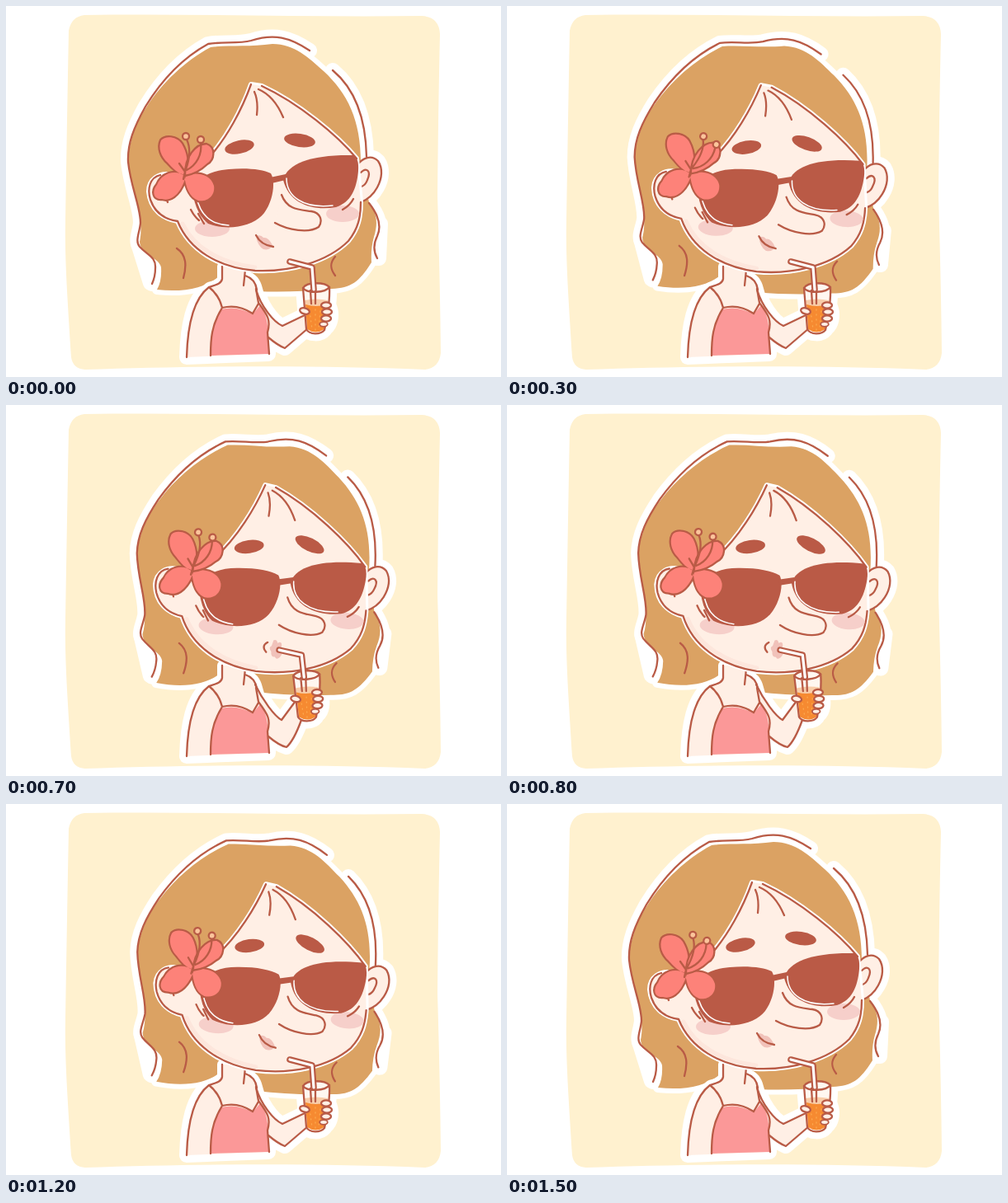
These frames come from a looping animation (600x450 px, 1600 ms). An HTML page without scripts:

```html
<!DOCTYPE html>
<html lang="en">
<head>
<meta charset="utf-8">
<title>Summer drink</title>
<style>
  @property --turn { syntax: "<number>"; inherits: true; initial-value: 0; }
  @property --sway { syntax: "<number>"; inherits: true; initial-value: 0; }
  @property --sip { syntax: "<number>"; inherits: true; initial-value: 0; }

  html, body { margin: 0; width: 100%; height: 100%; overflow: hidden; background: #fff; }
  svg {
    display: block; width: 100vw; height: 100vh;
    fill: none; stroke-linecap: round; stroke-linejoin: round;
    animation: sipping 1600ms step-end infinite;
  }

  /* turn: head tilt, sway: stamen angle, sip: drink raised */
  @keyframes sipping {
    0%     { --turn: 0;   --sway: 0;  --sip: 0; }
    6.25%  { --turn: .18; --sway: 7; }
    12.5%  { --turn: .38; --sway: 14; }
    18.75% { --turn: .55; --sway: 17; }
    25%    { --turn: .68; --sway: 13; --sip: 1; }
    31.25% { --turn: .79; --sway: 8; }
    37.5%  { --turn: .84; --sway: 5; }
    43.75% { --turn: .88; --sway: 3; }
    50%    { --turn: .91; --sway: 1; }
    56.25% { --turn: .96; --sway: 0; }
    62.5%  { --turn: 1;   --sway: 0; }
    75%    { --turn: .92; --sway: 1; --sip: 0; }
    81.25% { --turn: .76; --sway: 3; }
    87.5%  { --turn: .4;  --sway: 7; }
    93.75% { --turn: 0;   --sway: 10; --sip: 0; }
  }

  .head { transform-origin: 277px 330px; transform: rotate(calc(var(--turn) * 4.8deg)); }
  .brow { transform-origin: 356px 163px; transform: rotate(calc(8deg + var(--turn) * 16deg)); }
  .stamens { transform-origin: 217px 200px; transform: rotate(calc(var(--sway) * 1deg)); }
  .drink {
    transform-origin: 376px 365px;
    transform: translate(calc(var(--sip) * -11px), calc(var(--sip) * -14px)) rotate(calc(var(--sip) * -2deg));
  }
  .resting { opacity: calc(1 - var(--sip)); }
  .sipping { opacity: var(--sip); }

  .line { stroke: #b95b46; stroke-width: 2.3; }
  .halo { stroke: #fff; stroke-width: 18; fill: #fff; }
  .rim { stroke: #fff; stroke-width: 1.5; }
  .skin { fill: #ffefe5; }
  .hair { fill: #dba263; }
  .dark { fill: #ba5a46; }
  .petal { fill: #fd8279; }
  .blush { fill: #f6cfca; }
  .lips { fill: #f1c2ba; }
  .dress { fill: #fb9898; }
</style>
</head>
<body>
<svg viewBox="0 0 600 450" preserveAspectRatio="none">
  <defs>
    <path id="hair" d="M323 46C350 46 367 63 385 79C414 106 430 138 430 190L440 238C450 252 451 264 446 280Q442 294 443 311C428 335 418 342 395 343Q345 348 305 346L262 324C247 341 218 348 183 344Q189 334 188 317C186 305 163 302 162 286C166 268 161 248 155 222C148 200 147 187 149 176C153 154 160 138 170 123C190 92 218 66 248 50C270 47 295 50 323 46Z"/>
    <path id="strands" d="M368 54C344 38 325 33 297 42C282 46 262 43 245 46C214 63 188 91 169 122C155 147 147 167 148 189C151 219 163 243 163 263C162 275 156 285 162 292C171 302 182 304 181 318Q181 328 177 337M396 78C420 98 436 130 437 183M440 239C451 253 456 266 450 279C444 291 446 299 450 306"/>
    <path id="face" d="M297 95C287 123 268 161 243 187L202 205C185 201 173 211 173 225C175 247 190 258 208 261C222 296 257 317 302 321C345 323 390 310 415 285C427 270 430 256 430 238L425 185C402 157 355 118 310 97Z"/>
    <path id="ear" d="M426 193C432 184 443 180 451 188C457 197 456 209 450 220Q443 233 430 238Z"/>
    <path id="torso" d="M262 316V330C261 337 255 338 246 341C226 356 220 389 219 426L318 422L319 392L304 340C301 331 296 329 290 327V316Z"/>
    <path id="arm-low" d="M301 337C308 362 323 383 335 388L362 375L366 391L338 415Q327 410 317 401Z"/>
    <path id="arm-high" d="M301 337C309 355 324 377 334 382L351 359L358 382Q349 407 340 415Q328 411 317 401Z"/>
    <path id="glass" d="M360 342C365 334 387 335 392 341C393 360 389 379 386 393C381 399 368 399 364 392Z"/>
    <path id="straw" d="M344 310L371 317L373 344"/>
    <path id="petals" d="M218 206C208 203 202 197 196 190C188 183 184 172 188 163C193 157 207 158 213 167C219 177 222 190 218 206ZM218 206C203 197 188 204 183 217C177 224 178 235 189 234C203 238 214 223 218 206ZM216 206C228 201 248 203 252 218C254 231 243 238 233 236C222 232 218 219 216 206Z"/>
    <ellipse id="finger" rx="6" ry="3.6" class="skin line"/>
  </defs>

  <path fill="#fff1cf" d="M95 11C230 9 370 14 504 12Q525 13 526 34Q524 120 523 230Q526 330 527 421Q525 439 508 441C370 435 220 437 96 441Q81 440 79 426C75 360 71 310 72 260Q74 135 76 30Q79 13 95 11Z"/>

  <g class="halo">
    <use href="#torso"/>
    <use href="#arm-low" class="resting"/>
    <use href="#arm-high" class="sipping"/>
    <g class="drink" stroke-linejoin="round">
      <use href="#glass"/>
      <ellipse cx="385" cy="375" rx="9" ry="16"/>
    </g>
  </g>

  <g class="head">
    <g class="halo">
      <use href="#hair" stroke-width="12"/>
      <use href="#ear"/>
      <use href="#strands" fill="none"/>
      <path d="M160 288L175 336M454 264L452 306"/>
    </g>
    <use href="#hair" class="hair"/>
    <use href="#strands" class="line"/>
    <path class="line" d="M207 294C219 302 219 315 215 330M399 304C392 312 393 319 399 327"/>
  </g>

  <use href="#torso" class="halo" style="stroke-width:12"/>
  <use href="#torso" class="skin"/>
  <g class="resting">
    <use href="#arm-low" class="skin"/>
    <path class="line" d="M303 344C309 364 324 383 335 388L362 375M318 402Q330 412 338 415L366 391"/>
  </g>
  <g class="sipping">
    <use href="#arm-high" class="skin"/>
    <path class="line" d="M302 339C311 358 326 378 334 382L351 359M318 402Q331 413 340 415Q349 407 358 382"/>
  </g>
  <path class="dress" d="M261 368Q280 363 299 374L308 363C318 378 318 388 318 422L248 424C249 398 251 383 261 368Z"/>
  <path class="line" d="M262 316V331C261 337 255 338 246 341C226 356 220 389 219 426M290 320L288 339M290 327C299 330 303 337 304 344M246 341Q258 350 262 366Q281 361 299 373L306 361M303 343L306 360C318 376 321 382 317 396L319 422M262 366C249 387 248 404 248 424"/>

  <g class="head">
    <use href="#ear" class="skin line"/>
    <path class="line" d="M430 202C437 195 443 200 438 211Q436 217 431 219"/>
    <use href="#face" stroke="#fff" stroke-width="6"/>
    <use href="#face" class="skin"/>
    <path stroke="#fde6dc" stroke-width="5" d="M214 264C228 293 259 312 302 317"/>
    <path class="line" d="M297 95C287 123 268 161 243 187M310 97C355 118 402 157 425 185M187 205C174 208 171 222 175 235C181 252 193 259 208 261C222 296 257 317 302 321C345 323 390 310 415 285C427 270 430 256 430 238M301 104Q306 115 304 132M306 101Q325 109 336 135"/>
    <path class="line" d="M182 219Q190 221 196 238"/>

    <ellipse class="blush" cx="250" cy="270" rx="21" ry="10"/>
    <ellipse class="blush" cx="408" cy="252" rx="20" ry="10"/>
    <path class="line" d="M224 247Q228 255 234 260M233 252L240 264M408 247Q417 242 421 234"/>

    <ellipse class="dark" cx="283" cy="171" rx="18" ry="8" transform="rotate(-12 283 171)"/>
    <ellipse class="dark brow" cx="356" cy="163" rx="19" ry="8"/>

    <path class="skin line" d="M334 229C341 248 357 247 370 249C382 251 384 261 379 268C367 276 342 272 326 263"/>

    <g class="dark">
      <path d="M227 230C228 209 246 200 270 198C292 196 311 198 321 203C327 213 324 236 313 251C300 268 268 273 245 264Q231 253 227 230Z"/>
      <path d="M336 211C341 190 372 180 421 181Q428 184 427 200C425 222 418 238 400 244C372 249 343 240 336 211Z"/>
      <path d="M320 208L339 204V211L322 215Z"/>
    </g>
    <path class="rim" d="M231 232C235 251 246 265 270 266M340 209C340 231 360 246 396 242"/>

    <g class="resting">
      <path class="lips" d="M303 279Q309 277 312 281Q318 280 323 290Q320 297 312 295Q305 291 303 279Z"/>
      <path class="line" d="M303 278Q309 290 324 292"/>
    </g>
    <g class="sipping">
      <path class="lips" d="M321 282Q325 280 326 285Q332 281 331 290Q335 295 330 302Q326 306 324 302Q319 303 319 296Q315 291 319 289Z"/>
      <path class="line" d="M314 285Q306 290 313 297"/>
    </g>

    <use href="#petals" class="line" style="stroke-width:4.4"/>
    <use href="#petals" class="petal"/>
    <path class="petal line" d="M217 206C216 183 230 167 243 167C255 171 253 187 244 192Q233 203 217 206Z"/>
    <g class="stamens line">
      <path d="M218 198C224 181 223 170 219 162M219 199C231 193 238 180 236 166"/>
      <g fill="#fbc49b">
        <circle cx="218" cy="158" r="4"/>
        <circle cx="236" cy="162" r="4"/>
      </g>
    </g>
    <path class="line" d="M210 191L217 201L215 210"/>
  </g>

  <g class="drink">
    <use href="#glass" fill="#fff7f0"/>
    <path fill="#f8cda9" d="M362 357Q376 354 390 357L389 364H363Z"/>
    <path fill="#f68a31" d="M363 362Q376 366 389 362L386 392Q375 399 365 392Z"/>
    <path stroke="#fba94f" stroke-width="1.3" stroke-dasharray="1 5" d="M368 370L371 392M375 368V394M381 370L379 392"/>
    <path class="line" d="M369 345L370 361M375 345V361M360 342C365 349 387 348 392 341"/>
    <use href="#glass" class="line"/>
    <use href="#straw" stroke="#b95b46" stroke-width="7.6"/>
    <use href="#straw" stroke="#fff" stroke-width="3.2"/>
    <use href="#finger" transform="translate(362 370) rotate(15)"/>
    <use href="#finger" transform="translate(388 363)"/>
    <use href="#finger" transform="translate(389 371)"/>
    <use href="#finger" transform="translate(388 379)"/>
    <use href="#finger" transform="translate(385 386) scale(.8)"/>
  </g>
</svg>
</body>
</html>
```
